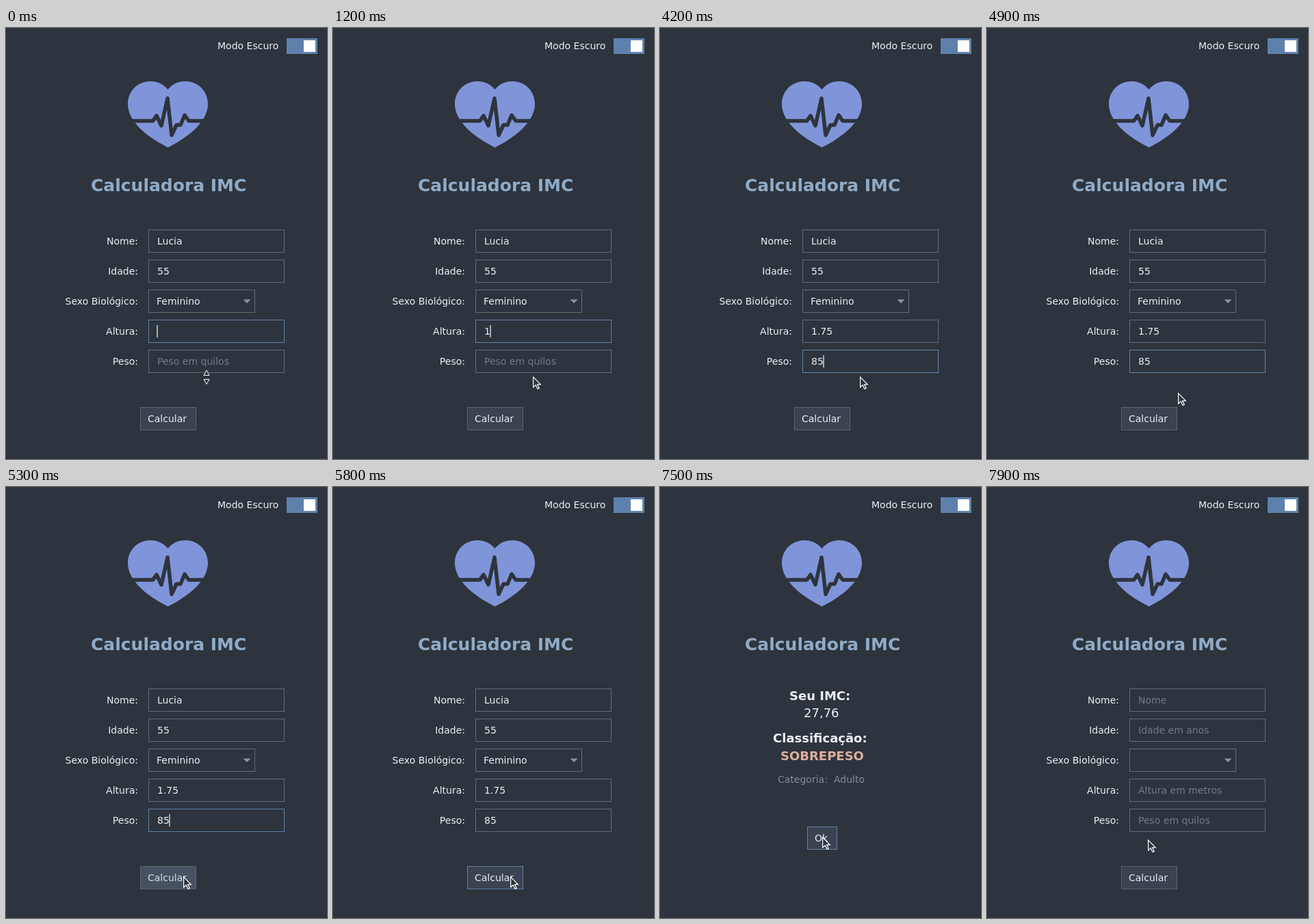
Write an HTML page that moves like this. It is 469 px wide and 631 px high and loops after 8000 ms.

```html
<!DOCTYPE html>
<html lang="pt">
<head>
<meta charset="utf-8">
<title>Calculadora IMC</title>
<style>
  html, body { margin: 0; width: 100%; height: 100%; overflow: hidden; background: #2d343d; }
  svg { display: block; }
  text { font: 14px "DejaVu Sans", sans-serif; fill: #eceff4; white-space: pre; }
  .title { font-size: 25px; font-weight: bold; fill: #8fabc8; }
  .big { font-size: 18px; }
  .bold { font-weight: bold; }
  .warn { fill: #dfae9f; }
  .muted { fill: #868c95; }
  .hint { fill: #727b84; }
  .box { fill: none; stroke: #616b73; }
  .focus { stroke: #5e81ac; }
  .button rect { fill: #3b4250; stroke: #5b646e; }
  .button.hover rect { fill: #465162; }
  .button.hover text { fill: #d8dee9; }
  .button.press rect { fill: #3b4250; stroke: #5e81ac; }
</style>
</head>
<body>
<svg id="stage" width="469" height="631" viewBox="0 0 469 631">
  <rect width="469" height="631" fill="#2d343d"/>
  <text x="309" y="31">Modo Escuro</text>
  <rect x="410" y="15" width="45" height="23" fill="#5e81ac"/>
  <rect x="435" y="18" width="17" height="17" fill="#fff"/>
  <path fill="#8094d9" d="M236.500 90C230 82 221 78 211 78C192 78 178 93 178 111C178 121 182 130 188 138C199 153 216 164 236.500 175C257 164 274 153 285 138C291 130 295 121 295 111C295 93 281 78 262 78C252 78 243 82 236.500 90Z"/>
  <path fill="none" stroke="#2d343d" stroke-width="5.500" stroke-linejoin="round" d="M178 136H214.500L220 128.500L227 143L236 103L242 157L249 142H255L261 127.500L267 136H296"/>
  <text class="title" x="124" y="239">Calculadora IMC</text>
  <g id="form"></g>
  <g id="result">
    <text class="big bold" x="189" y="312">Seu IMC:</text>
    <text class="big" x="210" y="337">27,76</text>
    <text class="big bold" x="165" y="374">Classificação:</text>
    <text class="big bold warn" x="176" y="400">SOBREPESO</text>
    <text class="muted" x="172" y="433">Categoria:</text>
    <text class="muted" x="254" y="433">Adulto</text>
  </g>
  <rect id="caret" width="2" height="18" fill="#a5abb3"/>
  <path id="resize" fill="#2d343d" stroke="#fff" d="M293 501L297 508.500H289ZM289 514.500H297L293 521.500Z"/>
  <path id="mouse" fill="#2d343d" stroke="#fff" stroke-width="1.200" d="M.6 .9V16L4.200 12.700L7 18.500L9.300 17.400L6.600 11.800H11.300Z"/>
</svg>
<script>
const LOOP = 8000;
const $ = id => document.getElementById(id);
const form = $("form"), result = $("result"), caret = $("caret"), mouse = $("mouse");

function add(parent, tag, attrs, text = "") {
  const el = document.createElementNS("http://www.w3.org/2000/svg", tag);
  for (const key in attrs) el.setAttribute(key, attrs[key]);
  el.textContent = text;
  return parent.appendChild(el);
}

function addField(row, label, hint, width = 198) {
  const y = 295.5 + row * 44;
  add(form, "text", { x: 193, y: y + 21.5, "text-anchor": "end" }, label);
  const box = add(form, "rect", { x: 208.5, y, width, height: 33, class: "box" });
  const value = add(form, "text", { x: row === 2 ? 220 : 221, y: y + 21.5 });
  return (text, focused) => {
    box.setAttribute("class", focused ? "box focus" : "box");
    value.setAttribute("class", text || focused ? "" : "hint");
    value.textContent = text || (focused ? "" : hint);
  };
}

function addButton(parent, x, y, width, label, textX) {
  const group = add(parent, "g", {});
  add(group, "rect", { x: x + 0.5, y: y + 0.5, width: width - 1, height: 33 });
  add(group, "text", { x: textX, y: y + 22 }, label);
  return state => group.setAttribute("class", "button " + state);
}

const setName = addField(0, "Nome:", "Nome");
const setAge = addField(1, "Idade:", "Idade em anos");
const setSex = addField(2, "Sexo Biológico:", "", 155);
const setHeight = addField(3, "Altura:", "Altura em metros");
const setWeight = addField(4, "Peso:", "Peso em quilos");
add(form, "path", { d: "M346.500 397.500H357.500L352 403Z", fill: "#8d949c" });
const setCalc = addButton(form, 196, 555, 82, "Calcular", 207);
const setOk = addButton(result, 215, 497, 44, "Ok", 226);

// Typed text by start time; the caret sits at the given x.
const heightKeys = [[0, "", 220], [1200, "1", 229], [2000, "1.", 233], [2500, "1.7", 242], [2700, "1.75", 251]];
const weightKeys = [[3400, "", 220], [4000, "8", 229], [4200, "85", 238]];
const latest = (keys, t) => keys.filter(k => k[0] <= t).pop() || [0, "", 220];

// Pointer moves: start, end, from, to.
const moves = [
  [4600, 5300, [292, 510], [259, 570]],
  [6200, 6500, [259, 570], [261, 560]],
  [6800, 7100, [261, 560], [237, 512]],
  [7700, 7900, [237, 512], [235, 516]]
];

function pointer(t) {
  let pos = moves[0][2];
  for (const [start, end, from, to] of moves) {
    if (t < start) break;
    const p = Math.min(1, (t - start) / (end - start));
    const e = p * p * (3 - 2 * p);
    pos = from.map((v, i) => Math.round(v + (to[i] - v) * e));
  }
  return pos;
}

const inside = ([px, py], x, y, w) => px >= x && px < x + w && py >= y && py < y + 34;
const show = (el, on) => el.setAttribute("display", on ? "inline" : "none");

function render(time) {
  const t = Math.floor(time % LOOP / 100) * 100;
  const onResult = t >= 6000 && t < 7700;
  const cleared = t >= 7700;
  const inHeight = t < 3400, inWeight = !inHeight && t < 5800;
  const typed = latest(inHeight ? heightKeys : weightKeys, t);
  const pos = pointer(t);

  show(form, !onResult);
  show(result, onResult);
  setName(cleared ? "" : "Lucia", false);
  setAge(cleared ? "" : "55", false);
  setSex(cleared ? "" : "Feminino", false);
  setHeight(cleared ? "" : latest(heightKeys, t)[1], inHeight);
  setWeight(cleared ? "" : latest(weightKeys, t)[1], inWeight);

  const blinkStart = typed[0] || -100;
  show(caret, (inHeight || inWeight) && (t - blinkStart) % 1000 < 500);
  caret.setAttribute("x", typed[2]);
  caret.setAttribute("y", inHeight ? 435 : 479);

  setCalc(t >= 5800 && t < 6000 ? "press" : inside(pos, 196, 555, 82) ? "hover" : "");
  setOk(t >= 7500 ? "press" : inside(pos, 215, 497, 44) ? "hover" : "");

  show($("resize"), t < 100);
  show(mouse, t >= 100);
  mouse.setAttribute("transform", `translate(${pos})`);
}

function tick() {
  render(performance.now());
  requestAnimationFrame(tick);
}
tick();
</script>
</body>
</html>
```
